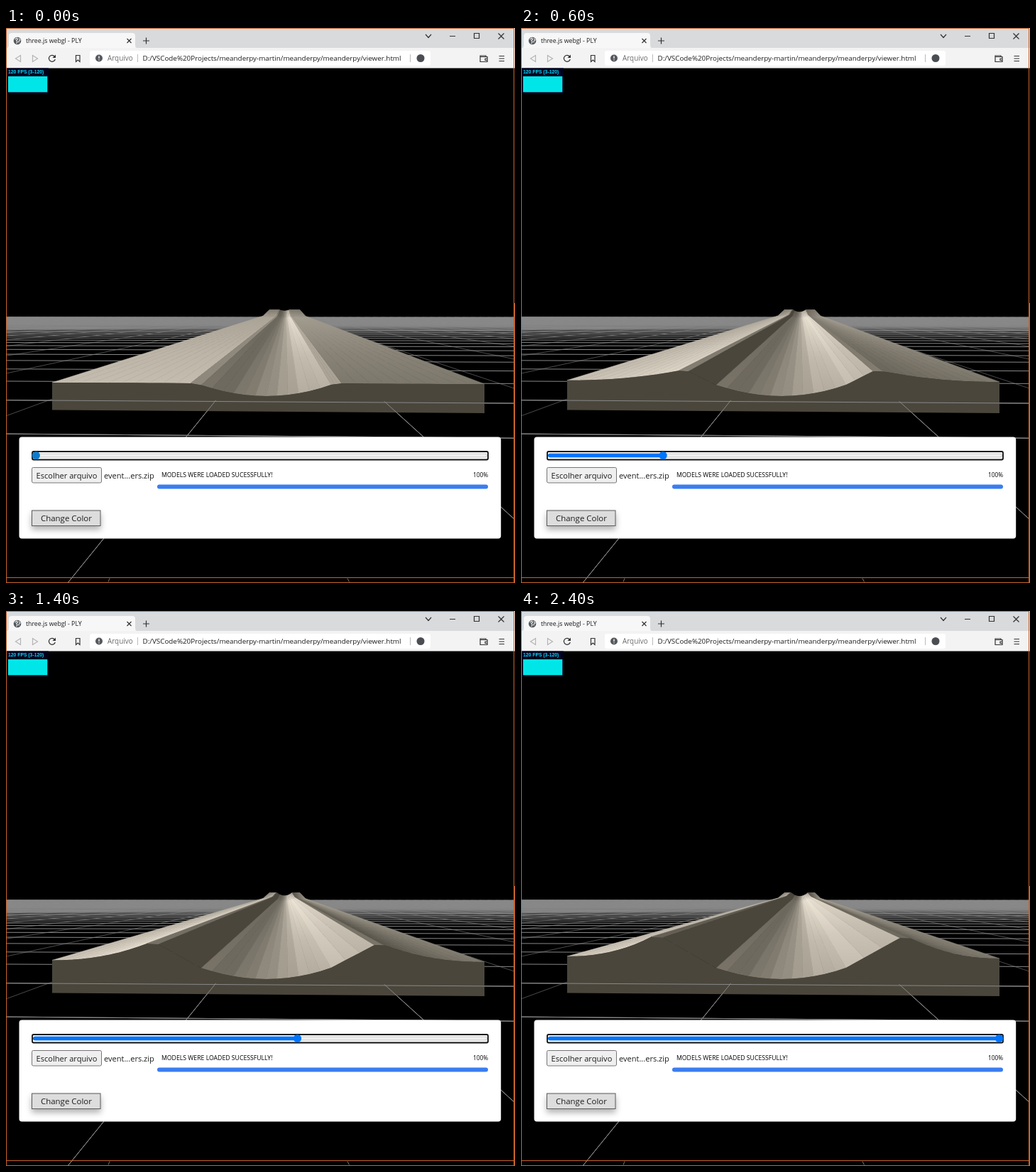
Animation of 717 by 781 pixels, one loop 2600 ms. Source, as an HTML page with a canvas:

```html
<!DOCTYPE html>
<html lang="pt">
<head>
<meta charset="utf-8">
<title>three.js webgl - PLY</title>
<style>
html, body { margin: 0; width: 100%; height: 100%; overflow: hidden; background: #000; }
canvas, svg { position: absolute; left: 0; top: 0; width: 717px; height: 781px; }
text { font-family: "Open Sans", "Noto Sans", sans-serif; fill: #1c1c1c; }
.ico { fill: none; stroke: #333; stroke-width: 1.2; }
.dim { stroke: #b4b4b4; }
</style>
</head>
<body>
<canvas id="scene" width="717" height="781"></canvas>
<svg viewBox="0 0 717 781">
  <!-- browser window -->
  <rect width="717" height="28" fill="#d8dadc"/>
  <rect y="28" width="717" height="28.5" fill="#f3f3f3"/>
  <path d="M2 28Q4 27 4 24V11Q4 7 8 7H178Q182 7 182 11V24Q182 27 184 28Z" fill="#f7f7f7"/>
  <circle cx="16" cy="18" r="5.3" fill="#55595d"/>
  <path d="M12.5 16l3-2 1 2-2 1.5 1.500 2-1.500 2.500M18 14.500l2 2.500-2 1.500v2" fill="none" stroke="#eee" stroke-width="1.1"/>
  <text x="28" y="21" font-size="8.75">three.js webgl - PLY</text>
  <path class="ico" d="M170.500 15l6 6m0-6l-6 6M193 18h9M197.500 13.500v9"/>
  <path class="ico" d="M591 9l4 4.500 4-4.500M625 11.500h8M659.500 7.500h7v7h-7zM693.500 7.500l8 8m0-8l-8 8"/>
  <path class="ico dim" d="M20.500 38.500v9l-7-4.500zM37.500 38.500v9l7-4.500z"/>
  <path class="ico" d="M68.500 40a4.500 4.500 0 1 0 .8 4"/>
  <path d="M70 37.500v4.500h-4.500z" fill="#333"/>
  <path class="ico" d="M98.500 38.500h5.500v9l-2.700-2.500-2.800 2.500z"/>
  <rect x="118" y="32" width="480" height="21" rx="3" fill="#fff"/>
  <circle cx="131" cy="42.5" r="5" fill="#55585c"/>
  <path d="M131 39.500v3.500m0 1.200v1.300" stroke="#fff" stroke-width="1.3"/>
  <text x="143" y="46" font-size="9.9" style="fill:#6b6b6b">Arquivo</text>
  <path d="M185.500 37v11M569.500 37v11" stroke="#bbb"/>
  <text x="192.5" y="46" font-size="9.85">D:/VSCode%20Projects/meanderpy-martin/meanderpy/meanderpy/viewer.html</text>
  <circle cx="584" cy="42.5" r="5.5" fill="#4a4d52"/>
  <path class="ico" d="M668.500 40.500h9.500v7h-10v-8.500h8v1.500M678 43h-3v2.500h3M694.500 39.500h7.500M694.500 43h7.500M694.500 46.500h7.500"/>

  <!-- frame counter -->
  <rect x="1" y="56.5" width="59" height="36" fill="#00001f"/>
  <text x="3" y="63.5" style="fill:#0df;font:bold 6.8px 'Liberation Sans',Arial,sans-serif">120 FPS (3-120)</text>
  <rect x="3" y="68" width="55.3" height="22.3" fill="#00e6e8"/>

  <!-- control panel -->
  <rect x="18.5" y="575.5" width="678.7" height="143" rx="4" fill="#fff"/>
  <rect x="37" y="596" width="642" height="11.5" rx="2" fill="#fff" stroke="#101010" stroke-width="1.8"/>
  <rect x="38.5" y="599" width="639" height="5" rx="2.5" fill="#efefef" stroke="#b8b8b8" stroke-width=".8"/>
  <rect id="fill" x="38" y="598.7" height="5.6" rx="2.8" fill="#0075ff"/>
  <circle id="thumb" cy="601.5" r="5.6"/>
  <rect x="36.5" y="618.5" width="98" height="21.5" rx="2" fill="#efefef" stroke="#767676"/>
  <text x="42.5" y="633.5" font-size="11.1">Escolher arquivo</text>
  <text x="138" y="633.5" font-size="11.05">event...ers.zip</text>
  <text x="219" y="631.5" font-size="8.7" style="fill:#000" font-weight="500">MODELS WERE LOADED SUCESSFULLY!</text>
  <text x="658" y="632" font-size="8.3" style="fill:#000">100%</text>
  <rect x="213" y="642.5" width="466" height="6" rx="3" fill="#3b7df0"/>
  <rect x="36.5" y="679" width="96.5" height="21.5" fill="#ddd" stroke="#5a5a5a" style="filter:drop-shadow(0 5px 4px rgba(0,0,0,.3))"/>
  <text x="49" y="694" font-size="11.45">Change Color</text>

  <path d="M0 .5H716M.5 0V781M715.500 0V781M716.500 387V781M0 773.500H716M0 780.500H716" fill="none" stroke="#c9622a"/>
  <path d="M146 774.500l-2 5M481 774.500l2.500 5" stroke="#777"/>
</svg>
<script>
const STEP = 200, COUNT = 13;
const VX = 395.4, HORIZON = 401, FAR_EDGE = 407;
const ctx = document.getElementById('scene').getContext('2d');
const thumb = document.getElementById('thumb');
const fill = document.getElementById('fill');

// Levee crests as they grow: outer and inner x, then y, for each side
const STAGES = [0, 2, 4, 5, 7, 9, 12];
const CREST = {
  lx0: [260, 232, 212, 212, 198, 197, 183],
  lx1: [260, 244, 228, 213, 215, 198, 200],
  ly: [500, 486.5, 478, 471, 468, 462, 458.5],
  rx0: [473, 488, 504, 518, 519, 534, 534],
  rx1: [473, 502, 519, 519, 533, 535, 549],
  ry: [500, 487, 479, 474, 470, 463, 460]
};

const mix = (a, b, t) => a + (b - a) * t;
const clamp = v => Math.max(0, Math.min(1, v));

function crestAt(k) {
  let i = 0;
  while (i < STAGES.length - 2 && k > STAGES[i + 1]) i++;
  const t = (k - STAGES[i]) / (STAGES[i + 1] - STAGES[i]);
  const out = {};
  for (const key in CREST) out[key] = mix(CREST[key][i], CREST[key][i + 1], t);
  return out;
}

function tone(s) {
  s = clamp(s);
  return `rgb(${mix(74, 244, s)},${mix(70, 235, s)},${mix(60, 220, s)})`;
}

function trace(pts) {
  ctx.beginPath();
  pts.forEach(p => ctx.lineTo(...p));
}

function line(...pts) {
  trace(pts);
  ctx.stroke();
}

function rows(count) {
  for (let n = 0; n < count; n++) {
    const d = 1 / (0.00588 + 0.00227 * n);
    line([0, HORIZON + d], [717, HORIZON + d * 1.036]);
  }
}

function columns(from, to) {
  const d0 = FAR_EDGE - HORIZON, d1 = 781 - HORIZON;
  for (let n = from; n <= to; n++) {
    const slope = -0.812 + 1.917 * n;
    line([VX + slope * d0, FAR_EDGE], [VX + slope * d1, 781]);
  }
}

function drawFloor() {
  const haze = ctx.createLinearGradient(0, FAR_EDGE, 0, 426);
  haze.addColorStop(0, '#888');
  haze.addColorStop(0.5, '#808080');
  haze.addColorStop(1, 'rgba(100,100,100,0)');
  ctx.fillStyle = haze;
  ctx.fillRect(0, FAR_EDGE, 717, 19);
  ctx.lineWidth = 1;
  ctx.strokeStyle = 'rgba(136,136,136,.55)';
  columns(-40, -1);
  columns(2, 40);
  ctx.strokeStyle = '#888';
  columns(0, 1);
  rows(71);
}

// Front profile, left to right, with a shade at the near and far end of each strip
function profile(k) {
  const c = crestAt(k), strips = [], grow = Math.min(1, k / 6);
  let last = [65, 499 - 1.08 * k];
  const add = (x, y, near, far) => {
    strips.push({ a: last, b: [x, y], near, far });
    last = [x, y];
  };
  const yl = last[1], yr = 501 - k;
  for (let i = 1; i <= 10; i++) {
    const t = i / 10;
    add(mix(65, c.lx0, t), mix(yl, c.ly, t ** 2.2), 0.72 + 0.28 * t * grow, 0.57 + 0.28 * t * grow);
  }
  add(c.lx1, c.ly + Math.min(1, k), 0.4 - 0.02 * k, 0.28 - 0.015 * k);
  add(275, 502.5, k ? (k < 2 ? 0.1 : 0) : 0.4, k ? 0 : 0.42);
  for (let j = 0; j < 12; j++) {
    const x = 275 + 15.25 * (j + 1), u = (j + 0.5) / 12;
    const rise = clamp((u - 0.12) / 0.7);
    const s = 0.16 + 0.46 * rise + Math.max(0, 0.15 - u) + 0.03 * (j % 2);
    add(x, 518 - 16 * ((x - 366.5) / 91.5) ** 2, s, 0.2 + 0.72 * rise * rise);
  }
  const bank = last;
  for (let i = 1; i <= 3; i++) {
    add(mix(bank[0], c.rx0, i / 3), mix(bank[1], c.ry, i / 3),
      k ? 0.76 - 0.03 * i : 0.55, k ? 1 - 0.04 * i : 0.65);
  }
  add(c.rx1, c.ry + Math.min(0.5, k), 0.36 - 0.012 * k, 0.36 - 0.015 * k);
  for (let i = 9; i >= 0; i--) {
    const t = i / 10;
    add(mix(674, c.rx1, t), mix(yr, c.ry, t ** 2.2), 0.3 - 0.22 * t * grow, 0.52 - 0.42 * t * grow);
  }
  return { strips, c };
}

function drawModel(k) {
  const { strips, c } = profile(k);
  const mid = (c.lx1 + c.rx0) / 2, half = (c.rx0 - c.lx1) / 2;
  const dip = 1.5 + 3.5 * Math.sqrt(k / 12);
  const bend = ([x, y]) => [362 + (x - 65) * 0.0985, 395 + (y - 395) * 0.0985];
  const top = ([x]) => [371 + (x - 65) * 0.0706, 396.5 + dip * Math.max(0, 1 - ((x - mid) / half) ** 2)];
  ctx.lineWidth = 0.6;
  for (const { a, b, near, far } of strips) {
    // Screen height stands for depth, so neighbouring strips shade alike
    const g = ctx.createLinearGradient(0, (a[1] + b[1]) / 2, 0, 397);
    g.addColorStop(0, tone(near));
    g.addColorStop(0.4, tone(mix(near, far, 0.3)));
    g.addColorStop(0.9, tone(far));
    g.addColorStop(1, tone(far * 0.65));
    ctx.fillStyle = ctx.strokeStyle = g;
    trace([a, b, bend(b), top(b), top(a), bend(a)]);
    ctx.closePath();
    ctx.fill();
    ctx.stroke();
  }
  ctx.fillStyle = tone(0);
  trace([strips[0].a, ...strips.map(s => s.b), [674, 542], [65, 537.5]]);
  ctx.fill();
}

// The floor cuts through the block, so its nearest lines lie in front
function drawNearLines() {
  ctx.save();
  trace([[0, 522], [717, 526.5], [717, 781], [0, 781]]);
  ctx.clip();
  ctx.strokeStyle = '#888';
  ctx.lineWidth = 1;
  rows(2);
  columns(0, 1);
  ctx.restore();
}

function draw(k) {
  ctx.fillStyle = '#000';
  ctx.fillRect(0, 0, 717, 781);
  drawFloor();
  drawModel(k);
  drawNearLines();
  const x = 42.3 + 52.6 * k;
  thumb.setAttribute('cx', x);
  thumb.setAttribute('fill', k === 0 ? '#0d7bcb' : '#0075ff');
  fill.setAttribute('width', x - 38);
}

let shown = -1;
function tick(now) {
  const k = Math.floor(now / STEP) % COUNT;
  if (k !== shown) draw(shown = k);
  requestAnimationFrame(tick);
}
draw(shown = 0);
requestAnimationFrame(tick);
</script>
</body>
</html>
```
